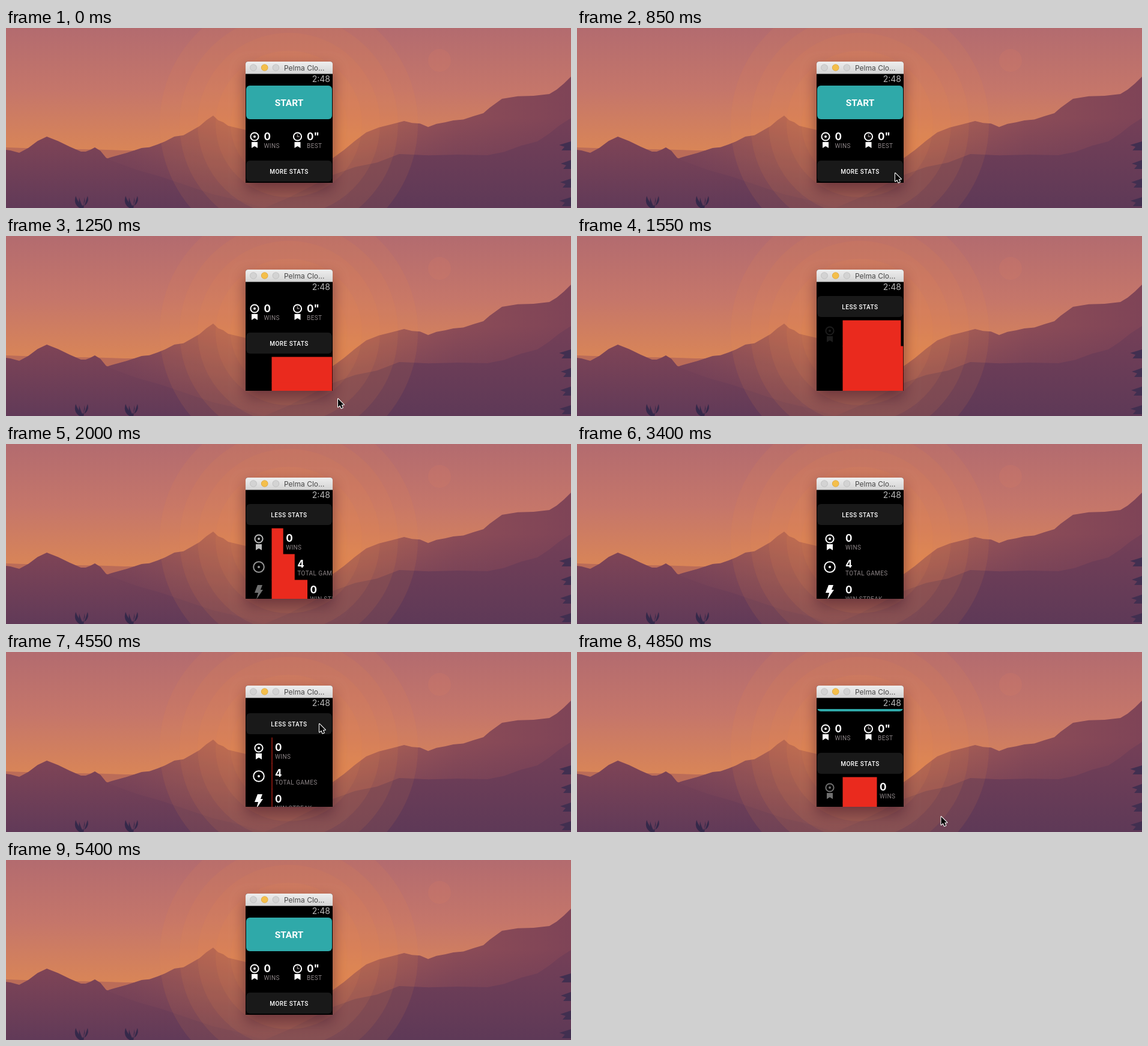
These frames come from a looping animation (941 px wide and 300 px high, 5450 ms). An HTML page with a canvas:

```html
<!DOCTYPE html>
<html lang="en">
<head>
<meta charset="utf-8">
<title>Watch stats</title>
<style>
html, body { margin: 0; width: 100%; height: 100%; overflow: hidden; background: #5c3a58; }
canvas { display: block; width: 941px; height: 300px; }
</style>
</head>
<body>
<canvas id="stage" width="941" height="300"></canvas>
<script>
const W = 941, H = 300, LOOP = 5450, STEP = 50;
const TRAVEL = 121, ROW = 43;
const ctx = document.getElementById('stage').getContext('2d');
const SANS = 'Roboto, Arial, sans-serif';
const INTER = 'Inter, Roboto, sans-serif';
const progress = (t, start, dur) => Math.max(0, Math.min(1, (t - start) / dur));
const ease = p => (1 - Math.cos(Math.PI * p)) / 2;
const mix = (a, b, p) => a + (b - a) * p;

function random(seed) {
  return () => {
    const v = Math.sin(++seed * 12.9898) * 43758.5453;
    return v - Math.floor(v);
  };
}

function fade(g, colors) {
  colors.forEach((color, i) => g.addColorStop(i / (colors.length - 1), color));
  return g;
}
const vertical = (c, y0, y1, ...colors) => fade(c.createLinearGradient(0, y0, 0, y1), colors);

function disc(c, x, y, r, fill) {
  c.beginPath();
  c.arc(x, y, r, 0, 7);
  c.fillStyle = fill;
  c.fill();
}

function ring(x, y, r) {
  ctx.beginPath();
  ctx.arc(x, y, r, 0, 7);
  ctx.lineWidth = 2;
  ctx.strokeStyle = '#fff';
  ctx.stroke();
}

function poly(c, pts, ...fills) {
  c.beginPath();
  pts.forEach(p => c.lineTo(...p));
  c.closePath();
  for (const fill of fills) {
    c.fillStyle = fill;
    c.fill();
  }
}

function box(x, y, w, h, r, fill) {
  ctx.beginPath();
  ctx.roundRect(x, y, w, h, r);
  ctx.fillStyle = fill;
  ctx.fill();
}

function text(s, x, y, font, fill, align = 'left', gap = 0) {
  ctx.font = font;
  ctx.fillStyle = fill;
  ctx.textAlign = align;
  ctx.letterSpacing = gap + 'px';
  ctx.fillText(s, x, y);
}

// Landscape

// Joins the peaks with short, slightly uneven slopes.
function ridge(c, peaks, seed, ...fills) {
  const rnd = random(seed), parts = 3, line = [];
  peaks.forEach(([x, y], i) => {
    line.push([x, y]);
    const next = peaks[i + 1];
    for (let k = 1; next && k < parts; k++) {
      const p = k / parts;
      line.push([mix(x, next[0], p), mix(y, next[1], p) + (rnd() - .5) * 5]);
    }
  });
  poly(c, [...line, [line.at(-1)[0], H], [line[0][0], H]], ...fills);
}

function plant(c, x, y) {
  for (const side of [-1, -.4, .5, 1]) {
    const reach = 11 * side, top = y + 4 * (1 - Math.abs(side));
    c.beginPath();
    c.moveTo(x - 3, H);
    c.quadraticCurveTo(x + reach * 1.3, y + 14, x + reach * .9, top);
    c.quadraticCurveTo(x + reach * .6, y + 10, x + 3, H);
    c.fillStyle = '#35294a';
    c.fill();
  }
}

function leaves(c) {
  const rnd = random(5);
  for (let y = 196; y < H; y += 31) {
    const tip = W - 16 - rnd() * 6;
    poly(c, [[W, y - 7], [tip, y - 1], [tip + 9, y + 2], [tip + 4, y + 8], [W, y + 8]], '#412f50');
  }
}

function paintScene() {
  const cv = document.createElement('canvas');
  cv.width = W;
  cv.height = H;
  const c = cv.getContext('2d');
  c.fillStyle = vertical(c, 0, 210, '#b36b6f', '#c5766a', '#da8656');
  c.fillRect(0, 0, W, H);
  disc(c, 722, 54, 19, 'rgba(222,125,95,.14)');

  const haze = fade(c.createRadialGradient(471, 160, 90, 471, 160, 470), ['#a85d57', '#8c4c57', '#7f4457']);
  const dusk = vertical(c, 150, 300, 'rgba(92,54,88,0)', 'rgba(92,54,88,.85)');
  ridge(c, [[0, 199], [110, 202], [240, 204]], 2, '#bb6c58');
  ridge(c, [[150, 224], [226, 200], [265, 189], [311, 170], [345, 146], [370, 163], [471, 185],
    [544, 217], [600, 174], [663, 155], [703, 165], [745, 154], [795, 142], [826, 118],
    [905, 110], [W, 81]], 7, haze, dusk);
  ridge(c, [[0, 203], [22, 208], [68, 181], [125, 206], [148, 199], [176, 221], [300, 262], [430, H]],
    3, vertical(c, 180, 300, '#7f4456', '#613a58'));
  ridge(c, [[430, H], [544, 245], [655, 210], [802, 212], [885, 189], [W, 150]],
    9, vertical(c, 160, 300, '#733f57', '#5e3957'));

  for (const r of [215, 182, 152, 122, 97]) disc(c, 471, 160, r, 'rgba(228,134,74,.1)');
  plant(c, 126, 280);
  plant(c, 209, 280);
  leaves(c);

  c.shadowColor = 'rgba(50,12,35,.5)';
  c.shadowBlur = 24;
  c.shadowOffsetY = 11;
  c.fillStyle = '#000';
  c.beginPath();
  c.roundRect(399, 56, 145, 202, [4, 4, 0, 0]);
  c.fill();
  return cv;
}
const scene = paintScene();

// Icons

function target(x, y, r) {
  ring(x, y, r);
  disc(ctx, x, y, 2, '#fff');
}

function ribbon(x, y) {
  poly(ctx, [[x - 5, y], [x + 5, y], [x + 5, y + 10], [x, y + 7], [x - 5, y + 10]], '#fff');
}

function medal(x, y) {
  target(x, y, 6.6);
  ribbon(x, y + 9);
}

function clockMedal(x, y) {
  ring(x, y, 6.6);
  ctx.fillRect(x - .8, y - 4, 1.6, 4.8);
  ctx.fillRect(x - .8, y - .8, 4.3, 1.6);
  ribbon(x, y + 9);
}

function bolt(x, y) {
  poly(ctx, [[x - 2, y], [x + 6, y], [x + 3, y + 8], [x + 7, y + 8], [x - 4, y + 24],
    [x - 1, y + 13], [x - 7, y + 13]], '#fff');
}

// Watch screen

function stat(value, label, x, y) {
  text(value, x, y, '700 17px ' + INTER, '#fff');
  text(label, x, y + 12.5, '10px ' + SANS, '#8c8486', 'left', .4);
}

const rows = [
  { value: '0', label: 'WINS', icon: y => medal(421, y + 17) },
  { value: '4', label: 'TOTAL GAMES', icon: y => target(421, y + 21, 8.8) },
  { value: '0', label: 'WIN STREAK', icon: y => bolt(421, y + 8) }
];

// Labels slide in from the right one after another, uncovering red on the way.
function list(t, top, leave) {
  rows.forEach((row, i) => {
    const y = top + i * ROW;
    const p = progress(t, 1451 + i * 104, 770);
    const shift = leave > 0 ? Math.round(101 * leave) : 101 * (1 - ease(p));
    ctx.fillStyle = '#ea2a1e';
    ctx.fillRect(442.5, y - .5, shift, ROW + .5);
    stat(row.value, row.label, 447 + shift, y + 22);
    ctx.globalAlpha = .8 * p * (1 - leave) + .2 * ease(p);
    if (leave > 0) ctx.globalAlpha = 1 - leave;
    row.icon(y);
    ctx.globalAlpha = 1;
  });
}

function screen(t) {
  const leave = ease(progress(t, 4500, 650));
  const open = ease(progress(t, 1000, 500)) - leave;
  const dy = -Math.round(TRAVEL * open);
  ctx.save();
  ctx.beginPath();
  ctx.rect(399, 95, 144.5, 163);
  ctx.clip();
  box(400, 96 + dy, 143, 56, 6, '#2fa9a9');
  text('START', 471.5, 129.5 + dy, '700 15.5px ' + SANS, '#fff', 'center');
  medal(414, 181 + dy);
  stat('0', 'WINS', 429.5, 187 + dy);
  clockMedal(485.5, 181 + dy);
  stat('0"', 'BEST', 501, 187 + dy);
  box(400, 221 + dy, 143, 35, 6, '#191919');
  text(open > .5 ? 'LESS STATS' : 'MORE STATS', 471.5, 243 + dy, '500 10px ' + SANS, '#fff', 'center', .5);
  if (open > 0) list(t, 262 + dy, leave);
  ctx.restore();
  text('2:48', 540, 90, '14px ' + INTER, '#b9b9b9', 'right');
}

function titleBar() {
  box(399, 56, 145, 20.5, [4, 4, 0, 0], vertical(ctx, 56, 76, '#eeeeee', '#d4d4d4'));
  ['#d3d3d3', '#f4bf4b', '#d3d3d3'].forEach((fill, i) => {
    const x = 412 + i * 18.7;
    disc(ctx, x, 66, 5.8, i === 1 ? '#dca63f' : '#bcbcbc');
    disc(ctx, x, 66, 5, fill);
  });
  text('Pelma Clo...', 463, 70.5, '12px ' + INTER, '#484848');
}

function arrow(x, y) {
  ctx.save();
  ctx.translate(x + 1, y + 1);
  ctx.scale(.9, .9);
  ctx.lineJoin = 'round';
  ctx.lineWidth = 2.4;
  ctx.strokeStyle = '#fff';
  const shape = new Path2D('M0 0V15L3.5 11.8L6 17.3L8.6 16.2L6.2 10.8H10.8Z');
  ctx.stroke(shape);
  ctx.fillStyle = '#000';
  ctx.fill(shape);
  ctx.restore();
}

function visit(t, start, end, x, y, fromX) {
  if (t < start || t > end) return;
  const p = ease(progress(t, start, 200)) - ease(progress(t, end - 200, 200));
  arrow(mix(fromX, x, p), mix(H, y, p));
}

function draw(t) {
  ctx.drawImage(scene, 0, 0);
  titleBar();
  screen(t);
  visit(t, 600, 1350, 529, 241, 575);
  visit(t, 4200, 4900, 521, 119, 620);
}

const begin = performance.now();
function frame() {
  const t = (performance.now() - begin) % LOOP;
  draw(Math.floor(t / STEP) * STEP);
  requestAnimationFrame(frame);
}
frame();
</script>
</body>
</html>
```
